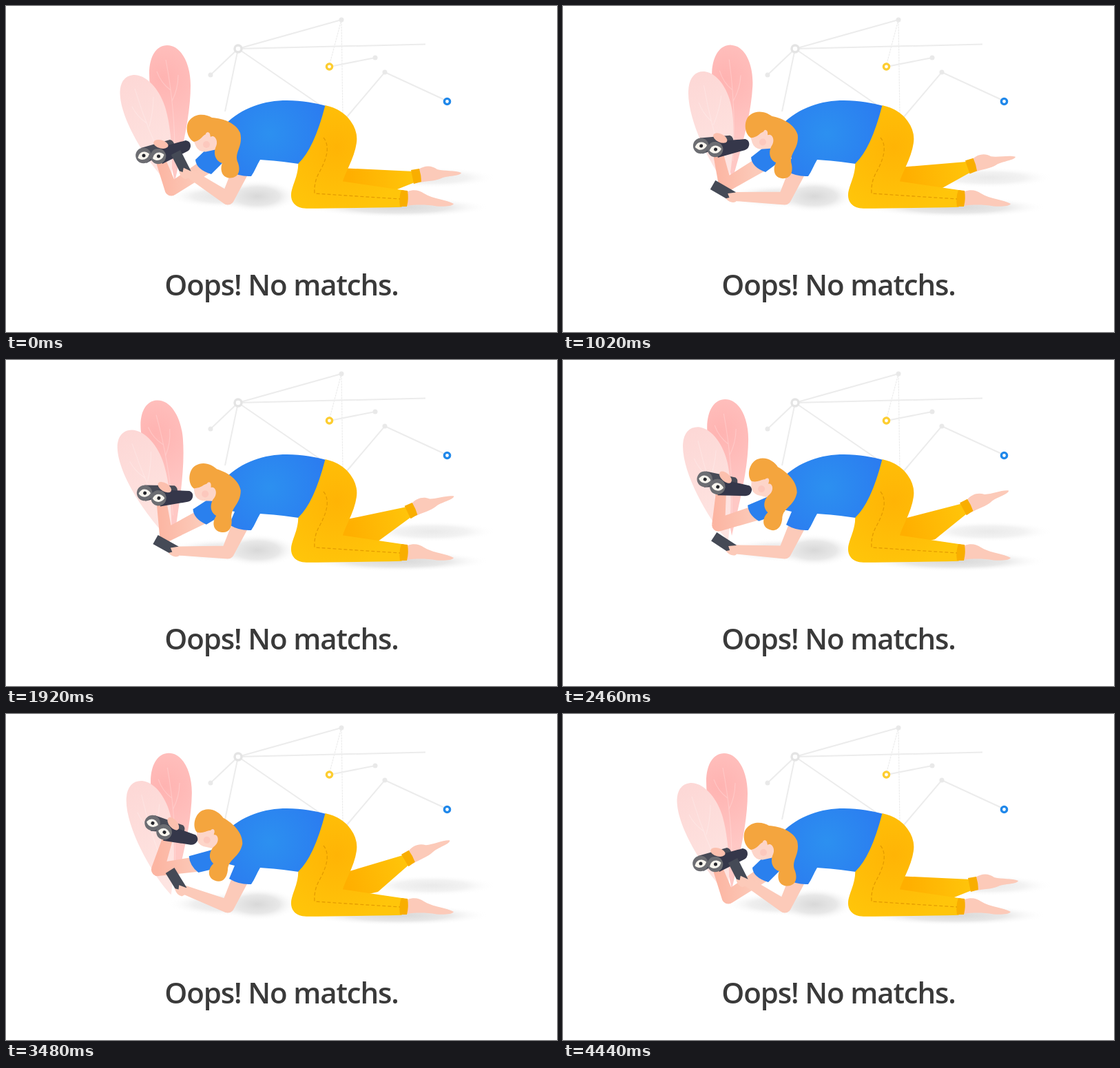
An HTML page for the animation above (4.47 s loop, 800 by 473 pixels).

```html
<!DOCTYPE html>
<html lang="en">
<head>
<meta charset="utf-8">
<title>No matches</title>
<style>
  html, body { margin: 0; height: 100%; overflow: hidden; background: #fff; }
  svg { display: block; width: 100%; height: 100%; }
  text { font: 600 42px "Open Sans", "Noto Sans", sans-serif; letter-spacing: -1.15px; fill: #3a3a3a; text-anchor: middle; }
  .net { fill: none; stroke: #ececec; stroke-width: 2; }
  .vein { fill: none; stroke: #fff; stroke-opacity: .22; stroke-width: 1.2; }
  .skin { fill: #fccab9; }
  .cuff { fill: #f9ae00; }
</style>
</head>
<body>
<svg viewBox="0 0 800 473">
  <defs>
    <radialGradient id="shade"><stop offset="0" stop-color="#d8d8d8"/><stop offset=".55" stop-color="#e8e8e8"/><stop offset="1" stop-color="#fff" stop-opacity="0"/></radialGradient>
    <radialGradient id="shirt" gradientUnits="userSpaceOnUse" cx="383" cy="185" r="85"><stop offset="0" stop-color="#2c90f0"/><stop offset="1" stop-color="#2b7cf0"/></radialGradient>
    <radialGradient id="pants" gradientUnits="userSpaceOnUse" cx="480" cy="205" r="100"><stop offset="0" stop-color="#ffb405"/><stop offset="1" stop-color="#ffc50a"/></radialGradient>
    <linearGradient id="calf" gradientUnits="userSpaceOnUse" x1="500" y1="0" x2="590" y2="0"><stop offset="0" stop-color="#ffaf00"/><stop offset="1" stop-color="#ffc40a"/></linearGradient>
    <radialGradient id="rose" gradientUnits="userSpaceOnUse" cx="228" cy="105" r="90"><stop offset="0" stop-color="#ffb3b1"/><stop offset="1" stop-color="#ffc8c5"/></radialGradient>
    <linearGradient id="blush" gradientUnits="userSpaceOnUse" x1="170" y1="110" x2="245" y2="240"><stop offset="0" stop-color="#fdd8d6"/><stop offset="1" stop-color="#fee5e2"/></linearGradient>
    <linearGradient id="skinFade" gradientUnits="userSpaceOnUse" x1="220" y1="0" x2="280" y2="0"><stop offset="0" stop-color="#fcb5a2"/><stop offset="1" stop-color="#fccab9"/></linearGradient>
  </defs>

  <g fill="url(#shade)">
    <ellipse cx="318" cy="276" rx="84" ry="17" opacity=".7"/>
    <ellipse cx="365" cy="276" rx="58" ry="24"/>
    <ellipse cx="570" cy="292" rx="132" ry="15"/>
    <ellipse cx="618" cy="249" rx="94" ry="15" opacity=".55"/>
  </g>

  <g class="net">
    <path d="M297 100L337 62L487 20M318 153L337 62L609 55.5M337 62L455 143M470 88L536 75M494 162L550 96L641 138"/>
    <path stroke-width="1.2" stroke-dasharray="3 1" d="M470 84L487 20L489 160"/>
    <g fill="#e9e9e9" stroke="none">
      <circle cx="297" cy="100" r="3.5"/><circle cx="487" cy="20" r="3.5"/>
      <circle cx="536" cy="75" r="3.5"/><circle cx="550" cy="96" r="3.5"/>
    </g>
    <g fill="#fff" stroke-width="3.4">
      <circle cx="337" cy="62" r="5" stroke="#e4e4e4"/>
      <circle cx="469.5" cy="88" r="4.1" stroke="#fdcd30"/>
      <circle cx="640.5" cy="138.5" r="4.1" stroke="#2088ea"/>
    </g>
  </g>

  <g id="backLeaf">
    <path fill="url(#rose)" d="M245 255C236 200 208 150 208 98C208 72 219 57 234 57C255 57 268 85 268 115C268 160 255 210 245 255Z"/>
    <path class="vein" d="M232 78Q246 150 245 225M219 95Q225 112 239 122M250 100Q250 120 241 138"/>
  </g>
  <g id="frontLeaf">
    <path fill="url(#blush)" d="M240 262C215 240 166 170 165.5 126C165.5 109 174 100 187 100C207 101 225 125 232 150C239 175 243 215 240 262Z"/>
    <path class="vein" d="M187 120Q205 180 235 240M183 146Q190 160 204 170M214 132Q214 152 208 175"/>
  </g>

  <path id="farArm" fill="url(#skinFade)"/>
  <path id="farSleeve" fill="#2a80ee"/>
  <path id="nearArm" class="skin"/>
  <path fill="url(#shirt)" d="M318 172C343 147 375 137 408 137C430 137 450 141 465 145C458 180 445 212 425 229C405 226 385 224 369 223C364 231 361 240 356 247Q339 248 324 239L332 220L312 215Z"/>

  <g id="leg">
    <path class="skin" d="M599 237C608 231 618 231 626 237C637 240 652 238 661 242C660 247 640 246 632 250C624 254 610 254 600 256Z"/>
    <path fill="url(#calf)" d="M475 232L495 235.5L592 240L593 256L538 278L480 272Z"/>
    <path class="cuff" d="M588 238L600 236Q603 246 603 255L592 258Z"/>
  </g>
  <path class="skin" d="M583 269C592 266 600 267 607 272C620 280 640 281 650 287C648 291 635 291 625 290.5C610 288 595 288 582 290Z"/>
  <path fill="url(#pants)" stroke="url(#pants)" stroke-width="1.4" d="M464 145C496 152 512 178 508 200C505 222 492 240 488 255L577 268L574 291C530 292 480 293 436 293C420 293 413 283 415 270C418 255 425 247 425 229C443 212 455 180 464 145Z"/>
  <path class="cuff" d="M574 267L583 268Q585 280 582 291L572 291Q570 278 574 267Z"/>
  <path fill="none" stroke="#e49c00" stroke-width="1.3" stroke-dasharray="5 3" d="M461 191C472 205 464 225 454 243Q447 256 448 272L572 280"/>

  <g id="head">
    <path fill="#fdd5c9" d="M270 190L276 204Q280 212 290 211.5L306 208L312 192L292 178Z"/>
    <circle cx="291" cy="201" r="5" fill="#fcbfb5" opacity=".6"/>
    <path fill="#f4a53e" d="M273 197C262 192 259 172 268 164C277 155 291 157 299 162C316 163 334 170 340 184C345 205 330 212 337 228C341 240 337 249 326 249.5C314 250 310 238 314 228C302 224 302 212 304 206C310 195 302 186 297 190C295 183 289 185 284 191Q279 196 273 197Z"/>
    <ellipse cx="293" cy="188.5" rx="3.5" ry="5.5" fill="#fdd5c9"/>
  </g>

  <g id="binoculars">
    <path fill="#484b57" d="M196 206L238 194Q244 195 245 204L204 228Z"/>
    <path fill="#35374a" d="M217 207L261 195Q268 196 268 203Q268 208 263 211L227 229Z"/>
    <g id="lens">
      <circle cx="221" cy="218" r="11.3" fill="#6c6d72"/>
      <path fill="#f8f5ee" d="M213 221Q215 212 223 212.5Q229 214 229.5 216Q227 224 219 224Q214 223 213 221Z"/>
      <circle cx="221.5" cy="218" r="2.5" fill="#26272c"/>
    </g>
    <use href="#lens" x="-21.5" y="-1"/>
    <ellipse cx="225" cy="200.5" rx="11" ry="6" transform="rotate(15 225 200)" fill="#fcc0ae"/>
  </g>

  <g id="phone">
    <path fill="#454a56" d="M-32 -7.5H2V7.5H-32Z"/>
    <path class="skin" d="M-7 0L2 -7Q11 -5 9 5Q4 11 -6 8L-2 4Z"/>
  </g>

  <text x="400" y="420">Oops! No matchs.</text>
</svg>
<script>
const LOOP = 4470;
const byId = id => document.getElementById(id);
const move = (id, value) => byId(id).setAttribute("transform", value);
const shape = (id, d) => byId(id).setAttribute("d", d);
const mix = (a, b, u) => a + (b - a) * u;

// Eased 0 to 1 between two times.
function ramp(t, start, end) {
  const u = Math.min(1, Math.max(0, (t - start) / (end - start)));
  return u * u * (3 - 2 * u);
}

// Rises over a..b, stays at 1, falls over c..d.
const hold = (t, a, b, c, d) => ramp(t, a, b) - ramp(t, c, d);
const bump = (t, peak, width) => hold(t, peak - width, peak, peak, peak + width);

// Tapered limb through joints given as [x, y, radius].
function limb(...joints) {
  let d = "";
  joints.forEach(([x, y, r], i) => {
    d += `M${x - r} ${y}a${r} ${r} 0 0 1 ${2 * r} 0a${r} ${r} 0 0 1 ${-2 * r} 0Z`;
    if (!i) return;
    const [px, py, pr] = joints[i - 1];
    const len = Math.hypot(x - px, y - py), nx = (y - py) / len, ny = (px - x) / len;
    d += `M${px + nx * pr} ${py + ny * pr}L${x + nx * r} ${y + ny * r}`
      + `L${x - nx * r} ${y - ny * r}L${px - nx * pr} ${py - ny * pr}Z`;
  });
  return d;
}

function swayLeaves(t) {
  const first = bump(t, 1100, 850), away = bump(t, 1950, 600), second = bump(t, 2980, 1100);
  move("backLeaf", `rotate(${3 * first - 4.5 * away + 1.3 * second} 246 258)`);
  move("frontLeaf", `rotate(${7.3 * first - 1.7 * away + 7 * second} 235 258)`);
}

function poseBody(t) {
  const up = hold(t, 650, 1380, 3580, 4340);
  const extra = .2 * bump(t, 1450, 600) + hold(t, 2050, 2850, 3250, 4440);
  const lift = .34 * up + .66 * extra;
  const lower = hold(t, 50, 1100, 2100, LOOP);

  move("leg", `rotate(${-up * (14.3 + 5.5 * extra)} 480 262)`);
  move("head", `translate(${14 * lift} ${-17 * lift}) rotate(${lift * (20 + 18 * lower)} 290 172)`);

  const bx = 221 + 10.5 * lift ** 3, by = 218 - 50 * lift;
  move("binoculars", `translate(${bx} ${by}) rotate(${37 * lift ** .75}) translate(-221 -218)`);

  // The sleeve hem runs from a to b.
  const ax = mix(275, 265, lift), ay = mix(223, 205, lift);
  const hemX = mix(298, 278, lift), hemY = mix(244, 229, lift);
  shape("farSleeve", `M${ax} ${ay}Q${ax + 1} ${ay + 14} ${hemX} ${hemY}L322 220L303 196Z`);
  shape("farArm", limb([(ax + hemX) / 2 + 3, (ay + hemY) / 2, 11],
    [240 - 21 * lift, 266 - 44 * lift ** 1.3, 9.5], [bx + 5, by + 10, 7.5]));

  const px = 261 - 16 * lower, py = 241 + 35 * lower;
  move("phone", `translate(${px} ${py}) rotate(${63 - 34 * lower ** 2})`);
  shape("nearArm", limb([340, 240, 12], [322, 279, 9.5], [px + 4, py + 1, 6.5]));
}

function draw() {
  const t = performance.now() % LOOP;
  swayLeaves(t);
  poseBody(t);
  requestAnimationFrame(draw);
}
draw();
</script>
</body>
</html>
```
